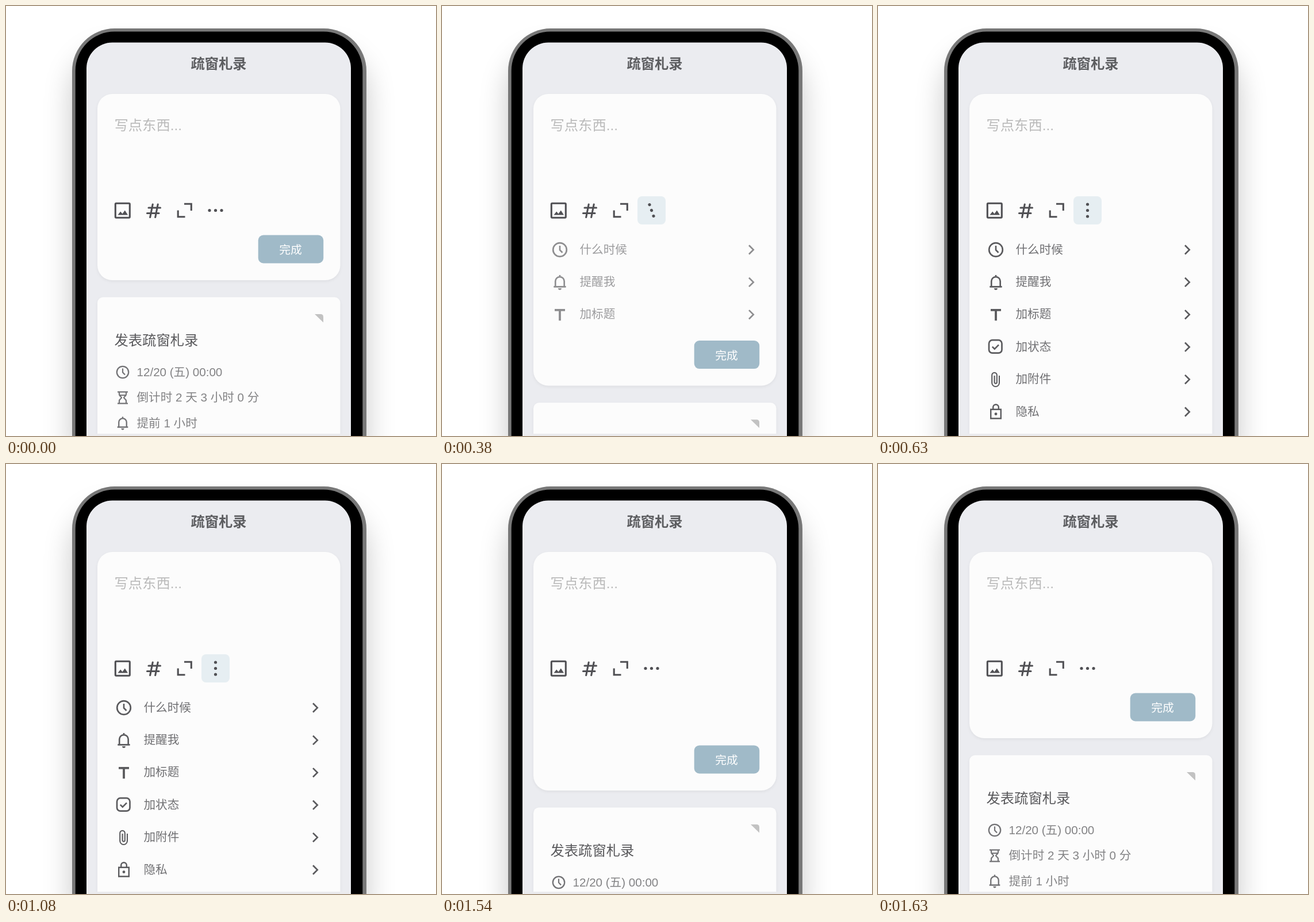
Recreate the animation shown at these times as an HTML page. Size 748 by 748 pixels, loop 2.02 s.

```html
<!DOCTYPE html>
<html lang="zh-CN">
<head>
<meta charset="utf-8">
<title>疏窗札录</title>
<style>
  html, body { margin: 0; width: 100%; height: 100%; overflow: hidden; background: #fff; }
  .stage { position: relative; width: 100%; height: 100%; overflow: clip; }
  .phone {
    position: absolute; left: 114.5px; top: 38.5px; right: 121px; bottom: 0;
    border-radius: 74px 74px 0 0; background: #787878;
    box-shadow: 0 40px 50px rgba(0, 0, 0, .22), 0 100px 0 #787878;
  }
  svg { position: absolute; left: 0; top: 0; width: 100%; height: 100%; }
  text { font-family: "Liberation Sans", "Noto Sans CJK SC", "Noto Sans CJK", sans-serif; }
  .big { font-size: 24.3px; }
  .small { font-size: 20.6px; }
  .line { fill: none; stroke: currentColor; stroke-width: 2.7; }
  .card { fill: #fcfcfc; filter: drop-shadow(0 2.5px 2.5px rgba(0, 0, 0, .055)); }
  #tools { color: #505054; }
  #tools .line { stroke-width: 3.1; }
  #rows { color: #5b5b5e; }
  #note { color: #737376; }
</style>
</head>
<body>
<div class="stage">
<div class="phone"></div>
<svg viewBox="0 0 748 748">
  <defs>
    <clipPath id="screen"><path d="M140 748V108.5a45 45 0 0 1 45-45H555a45 45 0 0 1 45 45V748z"/></clipPath>
    <clipPath id="fold"><rect id="foldBox" x="159" y="395" width="423" height="0"/></clipPath>
    <g id="bell">
      <path class="line" style="stroke-width:2" d="M6.2 18V11a5.8 5.8 0 0 1 11.6 0V18M4 18.2H20M12 5V2.8"/>
      <path d="M9.8 20.2h4.4a2.2 2.2 0 0 1-4.4 0z" fill="currentColor"/>
    </g>
    <path id="chevron" class="line" d="M534 -7.7l7.7 7.7-7.7 7.7"/>
  </defs>

  <path d="M120.7 748V112.5a68 68 0 0 1 68-68H552.3a68 68 0 0 1 68 68V748z"/>
  <g clip-path="url(#screen)">
    <rect x="140" y="63" width="460" height="685" fill="#ebecf0"/>
    <text class="big" x="370" y="108.6" text-anchor="middle" font-weight="600" fill="#5c5d60">疏窗札录</text>

    <rect id="editor" class="card" x="159" y="153" width="422.5" height="324" rx="26"/>
    <text class="big" x="188.5" y="216.2" fill="#bababa">写点东西...</text>

    <g id="tools">
      <rect id="tint" x="340" y="331" width="49" height="49" rx="8" fill="#e6eef2"/>
      <rect class="line" x="190.3" y="343.3" width="25" height="25" rx="1.5"/>
      <path d="M194.5 363.5l4.7-6 3.3 4 4.3-6 5.2 8z" fill="currentColor"/>
      <path class="line" stroke-linecap="round" d="M248 351H268.5M245.5 360.5H266M255.2 345l-4.5 22.5M264.2 345l-4.5 22.5"/>
      <path class="line" d="M310 344.3H322.3V356M299.2 355.5V366.8H311.5"/>
      <g id="dots" fill="currentColor">
        <circle cx="-10.5" r="2.6"/><circle r="2.6"/><circle cx="10.5" r="2.6"/>
      </g>
    </g>

    <g clip-path="url(#fold)"><g id="rows"></g></g>

    <g id="below">
      <rect x="438.7" y="398.5" width="113.5" height="49" rx="9" fill="#a0bac8"/>
      <text x="495" y="431" font-size="19.8" text-anchor="middle" fill="#fff">完成</text>
      <g id="note">
        <rect class="card" x="159" y="506.5" width="422.5" height="330" rx="10"/>
        <path d="M537 536H547.5a4.5 4.5 0 0 1 4.5 4.5V550.5z" fill="#c2c2c2"/>
        <text class="big" x="188.5" y="590" fill="#58585b">发表疏窗札录</text>
        <circle class="line" cx="203" cy="637" r="10.2" style="stroke-width:2.3"/>
        <path class="line" style="stroke-width:2.2" d="M203 630.5V637.3L207 641.5"/>
        <path class="line" style="stroke-width:2.2" d="M194 671.3H212M194 691.3H212M197 671.5V675.5C197 679 201 679.5 201 681.3S197 683.6 197 687.1V691M209 671.5V675.5C209 679 205 679.5 205 681.3S209 683.6 209 687.1V691M198 677H208"/>
        <use href="#bell" transform="translate(189 711.3) scale(1.165)"/>
        <g class="small" fill="#828284">
          <text x="227.5" y="644.3">12/20 (五) 00:00</text>
          <text x="227.5" y="688.4">倒计时 2 天 3 小时 0 分</text>
          <text x="227.5" y="732.5">提前 1 小时</text>
        </g>
      </g>
    </g>
    <rect x="140" y="744" width="460" height="4" fill="#ebebee"/>
  </g>
</svg>
</div>
<script>
  const $ = id => document.getElementById(id);
  const line = (d, width = 2.6) => `<path class="line" style="stroke-width:${width}" d="${d}"/>`;

  // Icons are centred on the origin of their row.
  const options = [
    ['什么时候', '<circle class="line" r="11.8"/>' + line('M0 -7V.5L4.5 5')],
    ['提醒我', '<use href="#bell" transform="translate(-16 -16.2) scale(1.33)"/>'],
    ['加标题', line('M-9 -8H9M0 -8V10.5', 3.8)],
    ['加状态', '<rect class="line" x="-12" y="-12" width="22.5" height="22.5" rx="6"/>' + line('M-6.2 -.6l4 4 7.2-7.2')],
    ['加附件', line('M6 -6.5V6a6.4 6.4 0 0 1-12.8 0V-7.5a4.3 4.3 0 0 1 8.6 0V5a2.1 2.1 0 0 1-4.2 0V-6.5', 2.1)],
    ['隐私', line('M-8.8 -4.2H8.8V11.5H-8.8zM-4.8 -4.5V-8a4.8 4.8 0 0 1 9.6 0V-4.5', 2.4) + '<circle cy="3.7" r="2.4" fill="currentColor"/>'],
  ];
  $('rows').innerHTML = options.map(([label, icon], i) => `
    <g transform="translate(0 ${424 + i * 56.4})">
      <g transform="translate(205 0)">${icon}</g>
      <text class="small" x="239.5" y="6.6" fill="#707073">${label}</text>
      <use href="#chevron"/>
    </g>`).join('');

  const bezier = (x1, y1, x2, y2) => x => {
    if (x <= 0) return 0;
    if (x >= 1) return 1;
    const at = (a, b, s) => 3 * a * s * (1 - s) ** 2 + 3 * b * s * s * (1 - s) + s ** 3;
    let lo = 0, hi = 1;
    for (let i = 0; i < 24; i++) {
      const mid = (lo + hi) / 2;
      if (at(x1, x2, mid) < x) lo = mid; else hi = mid;
    }
    return at(y1, y2, lo);
  };
  const ease = bezier(.25, .1, .25, 1);
  const standard = bezier(.4, 0, .2, 1);

  const LOOP = 2020, TICK = 1000 / 24, OPEN = 245, CLOSE = 1467.5, TRAVEL = 395.5;

  // Openness from 0 to 1, given how long opening and closing take.
  const openness = (t, openTime, closeTime, openEase = ease) =>
    t < CLOSE ? openEase((t - OPEN) / openTime) : 1 - ease((t - CLOSE) / closeTime);

  function draw() {
    const now = performance.now() % LOOP;
    const t = Math.floor(now / TICK + .1) * TICK;
    const shift = TRAVEL * openness(t, 387, 158, standard);
    $('editor').setAttribute('height', 324 + shift);
    $('foldBox').setAttribute('height', shift);
    $('below').setAttribute('transform', `translate(0 ${shift})`);
    $('rows').setAttribute('opacity', openness(t, 325, 78));
    $('dots').setAttribute('transform', `translate(364.5 355.5) rotate(${90 * openness(t, 270, 62)})`);
    $('tint').setAttribute('opacity', t > OPEN && t < CLOSE ? 1 : 0);
    requestAnimationFrame(draw);
  }
  draw();
</script>
</body>
</html>
```
